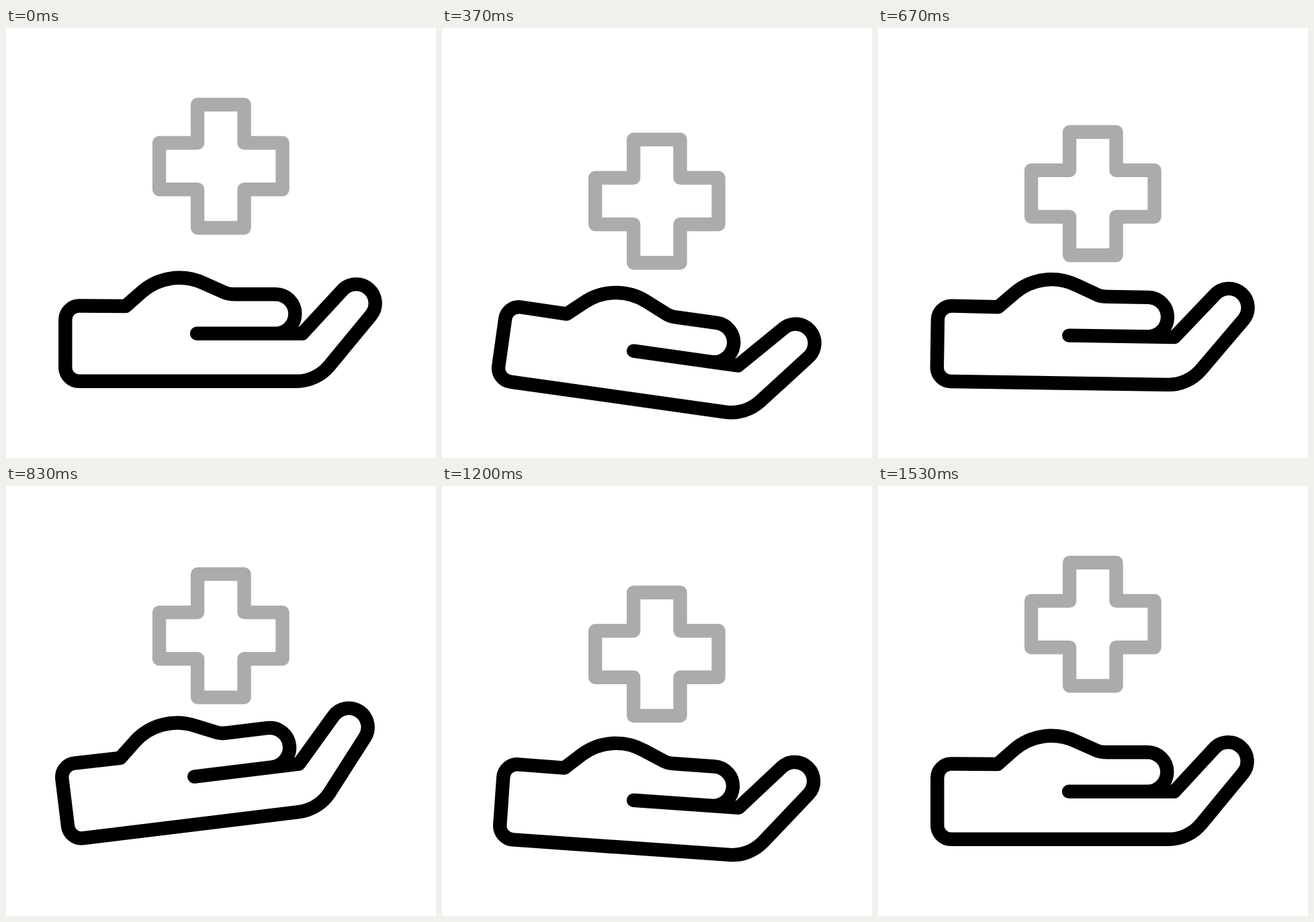
Write an HTML page that moves like this. It is 640 px wide and 640 px high and loops after 1670 ms.

```html
<!DOCTYPE html>
<html>
<head>
<meta charset="utf-8">
<style>
  html, body { margin: 0; width: 100%; height: 100%; overflow: hidden; background: #fff; }
  svg { display: block; width: 100vw; height: 100vh; }
  path { fill: none; stroke: #000; stroke-width: 20.4; stroke-linecap: round; stroke-linejoin: round; }
  #cross { stroke: #ababab; }
</style>
</head>
<body>
<svg viewBox="0 0 640 640">
  <path id="cross" d="M285.1 114H354.5V171H411.5V240.2H354.5V297.5H285.1V240.2H228.1V171H285.1Z"/>
  <path id="hand" d="M284 454.8H441L500.6 390.4A28.3 28.3 0 0 1 543.3 427.5L481 503A63.5 63.5 0 0 1 432 525.8H109A20.7 20.7 0 0 1 88.3 505V434.3A20.7 20.7 0 0 1 109 413.5L178 414L202.3 392.6A85 85 0 0 1 294 379.7L326 394Q331 396.2 341 396.2H401A29.3 29.3 0 0 1 401 454.8"/>
</svg>
<script>
  const LOOP = 1670, STEP = 33.4;
  const cross = document.getElementById('cross');
  const hand = document.getElementById('hand');

  // [step, cross drop in px, hand tilt in degrees, time warp towards this key]
  const keys = [
    [4, 0, 0, 1],
    [14.6, 71, 10.9, 1],
    [24.6, 17, -7, 1],
    [36, 44.5, 4, 1],
    [46, 0, 0, 0.85]
  ];

  function pose(step) {
    const i = keys.findIndex(key => step < key[0]);
    if (i < 1) return [0, 0];
    const [from, drop, tilt] = keys[i - 1];
    const [to, nextDrop, nextTilt, warp] = keys[i];
    const x = ((step - from) / (to - from)) ** warp;
    const ease = x * x * (3 - 2 * x);
    return [drop + (nextDrop - drop) * ease, tilt + (nextTilt - tilt) * ease];
  }

  function draw() {
    const step = Math.floor(performance.now() % LOOP / STEP + 0.2);
    const [drop, tilt] = pose(step);
    cross.setAttribute('transform', `translate(0 ${drop})`);
    hand.setAttribute('transform', `rotate(${tilt} 99 475)`);
    requestAnimationFrame(draw);
  }
  draw();
</script>
</body>
</html>
```
